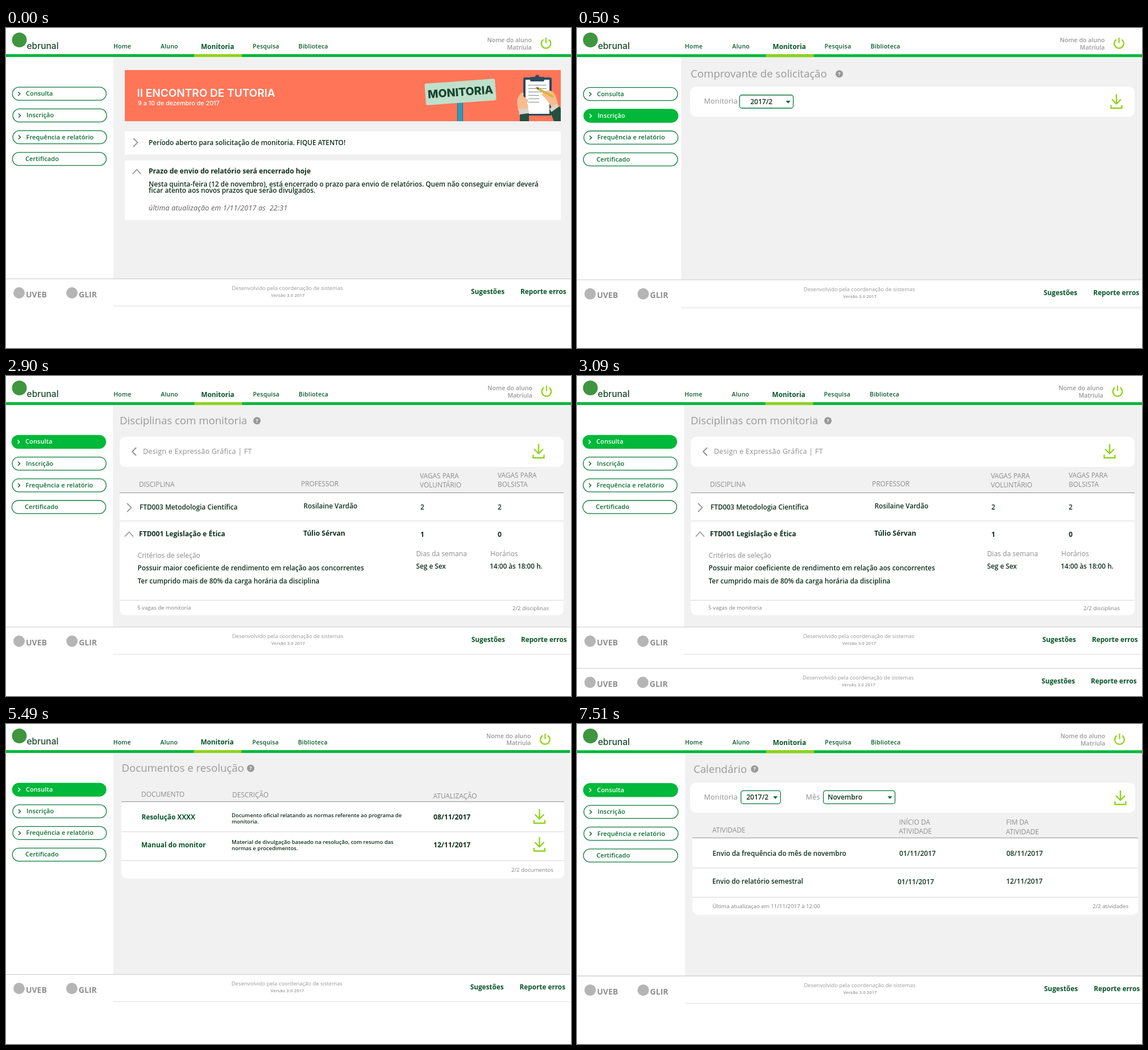
An HTML page that plays this animation: 994 px wide and 563 px high, repeating every 8 s.

```html
<!DOCTYPE html>
<html lang="pt">
<head>
<meta charset="utf-8">
<style>
html, body { margin: 0; width: 100%; height: 100%; overflow: hidden; background: #fff; }
svg { display: block; width: 100vw; height: 100vh; }
text { font: 600 11.8px "Open Sans", sans-serif; fill: #10301f; }
.nav { font-size: 10.5px; letter-spacing: .2px; fill: #0b5a2c; }
.item { font-size: 11px; letter-spacing: .1px; fill: #0b6b33; }
.bold { font-weight: 700; font-size: 12.1px; }
.semi { font-size: 12px; }
.title { font-weight: 400; font-size: 18.6px; fill: #999; }
.label { font-weight: 500; font-size: 12.1px; fill: #8c8c8c; }
.head { font-weight: 400; font-size: 11.9px; fill: #8c8c8c; }
.field { font-weight: 500; font-size: 12.5px; letter-spacing: .25px; fill: #8c8c8c; }
.small { font-size: 9.45px; }
.note { font-weight: 500; font-size: 9.7px; fill: #808080; }
.user { font-size: 10.6px; fill: #999; text-anchor: end; }
.credit { font-weight: 500; font-size: 9.5px; fill: #999; text-anchor: middle; }
.version { font-size: 7.6px; letter-spacing: .15px; fill: #999; text-anchor: middle; }
.link { font-weight: 700; font-size: 11.8px; fill: #07542a; }
.brand { font: 500 15.5px Inter, sans-serif; fill: #1c4a2c; }
.org { font-weight: 700; font-size: 14px; fill: #8f8f8f; }
.updated { font-style: italic; font-weight: 400; font-size: 12.4px; letter-spacing: .25px; fill: #5c5c5c; }
.banner { font: 600 19px Inter, sans-serif; fill: #fff; }
.dates { font: 500 10.8px Inter, sans-serif; fill: #fff; }
.sign { font: 800 19.5px Inter, sans-serif; fill: #17452f; text-anchor: middle; }
.mark { font-weight: 700; font-size: 9px; fill: #fff; text-anchor: middle; }
.white { fill: #fff; }
</style>
</head>
<body>
<svg id="stage" viewBox="0 0 994 563" preserveAspectRatio="none"></svg>
<script>
const GREEN = '#00b83a', LIME = '#90d31c', DARK = '#0b7a3c', PANEL = '#f1f1f1';

// Drawing helpers: each returns SVG markup
const text = (x, y, str, cls = '') => `<text x="${x}" y="${y}" class="${cls}">${str}</text>`;
const rect = (x, y, w, h, fill = '#fff', r = 0, stroke = 'none') =>
  `<rect x="${x}" y="${y}" width="${w}" height="${h}" rx="${r}" fill="${fill}" stroke="${stroke}" stroke-width="1.3"/>`;
const circle = (x, y, r, fill) => `<circle cx="${x}" cy="${y}" r="${r}" fill="${fill}"/>`;
const line = (d, color, width = 1) => `<path d="${d}" fill="none" stroke="${color}" stroke-width="${width}"/>`;
const shape = (d, fill) => `<path d="${d}" fill="${fill}"/>`;
const group = (transform, body) => `<g transform="${transform}">${body}</g>`;
const rule = (x1, x2, y, color = '#d6d6d6') => line(`M${x1} ${y}H${x2}`, color);

const card = (x, y, x2, y2, r = 10) => rect(x, y, x2 - x, y2 - y, '#fff', r);
const table = (x, y, x2, y2) => card(x, y, x2, y2) + rect(x, y, x2 - x, 14) + rule(x, x2, y, '#8f8f8f');
const right = (x, y) => line(`M${x} ${y - 7.5}l7.5 7.5l-7.5 7.5`, '#999', 1.8);
const left = (x, y) => line(`M${x} ${y - 7}l-7 7l7 7`, '#8c8c8c', 1.8);
const up = (x, y) => line(`M${x - 7.5} ${y + 4}l7.5 -8l7.5 8`, '#999', 1.8);
const title = (x, y, str, markX) =>
  text(x, y, str, 'title') + circle(markX, y - 6.3, 6.5, '#999') + text(markX, y - 3.2, '?', 'mark');
const download = (x, y) =>
  line(`M${x} ${y}v17m-8 -8l8 8l8 -8M${x - 9.5} ${y + 19}v5.5h19v-5.5`, LIME, 2.3);
const select = (x, y, w, textX, str) => rect(x, y, w, 23, '#fff', 4, DARK) +
  text(textX, y + 15.5, str, 'semi') + shape(`M${x + w - 13} ${y + 10}h8l-4 4.5z`, '#0b5a2c');
const checkbox = (x, y, on) => rect(x, y, 13, 13, '#fff', 2, DARK) +
  (on ? line(`M${x + 3} ${y + 6.5}l2.8 3l4.5 -6`, '#0b5a2c', 1.7) : '');

const header = () =>
  circle(23.5, 21, 13, '#3f963f') + text(36.5, 36.5, 'ebrunal', 'brand') +
  rect(0, 46, 994, 5, GREEN) + rect(331, 46, 84, 5, LIME) +
  [[189, 'Home'], [272, 'Aluno'], [434, 'Pesquisa'], [514.5, 'Biblioteca']]
    .map(([x, str]) => text(x, 36, str, 'nav')).join('') +
  text(343, 36.5, 'Monitoria', 'link') +
  text(925, 25, 'Nome do aluno', 'user') + text(925, 37.5, 'Matríula', 'user') +
  line('M945.5 20.3a8.3 8.3 0 1 0 9 0M950 17v9.5', LIME, 2.2);

const sidebar = active => ['Consulta', 'Inscrição', 'Frequência e relatório', 'Certificado']
  .map((name, i) => {
    const on = i === active, x = [11.3, 12, 12, 11.3][i], y = 104.2 + i * 38.2;
    return rect(x, y, 165, 23, on ? GREEN : '#fff', 11.5, on ? GREEN : DARK) +
      (i < 3 ? line(`M${x + 10} ${y + 8.2}l3.5 3.4l-3.5 3.4`, on ? '#fff' : '#0b5a2c', 1.4) : '') +
      text([35, 36, 35.5, 34][i], y + 15, name, on ? 'item white' : 'item');
  }).join('');

const footer = (scale, dy) => group(`scale(${scale}) translate(0 ${dy})`,
  rule(0, 994, 441.3, '#c9c9c9') +
  circle(23, 466, 10, '#b5b5b5') + text(35, 473.7, 'UVEB', 'org') +
  circle(116, 466, 10, '#b5b5b5') + text(128, 473.7, 'GLIR', 'org') +
  text(495, 461, 'Desenvolvido pela coordenação de sistemas', 'credit') +
  text(495.8, 473, 'Versão 3.0 2017', 'version') +
  text(818, 468, 'Sugestões', 'link') + text(905, 468, 'Reporte erros', 'link'));

function page({ scale, active, edge = 189, sideX = 0, dy = 0, strip = 1.2 }, content) {
  return rect(0, 0, 994, 563) +
    group(`scale(${scale})`,
      rect(edge, 51, 994 - edge, 390 + dy, PANEL) +
      rect(edge, 488.6 + dy, 994 - edge, strip, strip > 2 ? PANEL : '#e2e2e2') +
      header() + group(`translate(${sideX} 0)`, sidebar(active))) +
    footer(scale, dy) + content;
}

const signpost = rect(794, 131, 10, 33, '#2c9cc0') + line('M794.5 131v33M803.5 131v33', '#1f6f8c') +
  group('translate(799.5 112.5) rotate(-4.2)',
    rect(-62, -19, 124, 38, '#bfe0cb', 3) + text(0, 7, 'MONITORIA', 'sign'));

const clipboard =
  rect(910, 87, 50, 67, '#2b4a5e', 3) + rect(914, 91, 42, 60) +
  rect(922, 86, 25, 8, '#2b4a5e', 2) + circle(934.5, 86, 3.5, '#2b4a5e') +
  [0, 1, 2, 3, 4, 5].map(i => rule(919, i > 2 ? 938 : 951, 100.5 + i * 6, '#7c8a90')).join('') +
  shape('M901 145L899 130Q899 122 907 114Q912 112 910 120L917 125Q921 129 916 132Q921 137 917 145Z', '#f6bd91') +
  shape('M942 117Q950 106 962 112Q969 120 971 136L961 143Q955 128 942 117Z', '#f6bd91') +
  line('M936 107L963 121', '#d9b42c', 4) + shape('M932 104l6 1l-2 4z', '#7a5a35') +
  shape('M902 143l17 -1l1 9l-17 2z', '#d8d5cb') + shape('M956 142l13 -9l5 6l-13 11z', '#d8d5cb') +
  shape('M904 152l16 -2v14h-16z', '#24503f') + shape('M958 149l15 -11l3 3v23h-12z', '#24503f');

const criteria = (x, y) => text(x, y, 'Critérios de seleção', 'label') +
  text(x, y + 22, 'Possuir maior coeficiente de rendimento em relação aos concorrentes') +
  text(x, y + 45.3, 'Ter cumprido mais de 80% da carga horária da disciplina');

const news = page({ scale: 1 },
  rect(209, 74, 767, 90, '#ff7558') +
  text(230.5, 120.5, 'II ENCONTRO DE TUTORIA', 'banner') +
  text(232, 136, '9 a 10 de dezembro de 2017', 'dates') + signpost + clipboard +
  card(209, 182, 976, 222.5, 0) + right(224, 201.5) +
  text(251, 205.5, 'Período aberto para solicitação de monitoria. FIQUE ATENTO!') +
  card(209, 233, 976, 338, 0) + up(230, 253) +
  text(251, 256, 'Prazo de envio do relatório será encerrado hoje', 'bold') +
  text(251, 279, 'Nesta quinta-feira (12 de novembro), está encerrado o prazo para envio de relatórios. Quem não conseguir enviar deverá') +
  text(251, 290, 'ficar atento aos novos prazos que serão divulgados.') +
  text(251, 320.5, 'última atualização em 1/11/2017 as\u00a0 22:31', 'updated'));

const receipt = page({ scale: 1.0037, active: 1, edge: 182.6, strip: 3.2 },
  title(200, 87, 'Comprovante de solicitação', 461.5) +
  card(199, 103, 981, 156) + text(223.5, 133, 'Monitoria', 'field') +
  select(286, 118, 94.5, 305, '2017/2') + download(949, 116.5));

const subjects = page({ scale: 1.001, active: 0, edge: 188, sideX: -1 },
  title(200, 85, 'Disciplinas com monitoria', 441.5) +
  card(200, 107, 981, 160) + left(229, 133) +
  text(241, 137, 'Design e Expressão Gráfica | FT', 'field') + download(937, 119.5) +
  text(234, 194.5, 'DISCIPLINA', 'head') + text(519, 194, 'PROFESSOR', 'head') +
  text(728, 180, 'VAGAS PARA', 'head') + text(728, 196, 'VOLUNTÁRIO', 'head') +
  text(865, 178.5, 'VAGAS PARA', 'head') + text(865, 194.5, 'BOLSISTA', 'head') +
  table(200, 205.5, 981, 421) + rule(200, 981, 255) + rule(200, 981, 394.5) +
  right(213, 231.5) + text(235, 234.5, 'FTD003 Metodologia Científica') +
  text(523.5, 233, 'Rosilaine Vardão') + text(729, 235, '2', 'semi') + text(865, 235, '2', 'semi') +
  up(216.5, 278.5) + text(234, 282, 'FTD001 Legislação e Ética', 'bold') +
  text(523, 280.5, 'Túlio Sérvan', 'bold') + text(729, 283, '1', 'bold') + text(865, 283, '0', 'bold') +
  criteria(231.5, 320) +
  text(721.5, 317, 'Dias da semana', 'label') + text(721.5, 339, 'Seg e Sex') +
  text(852, 317, 'Horários', 'label') + text(851, 338.5, '14:00 às 18:00 h.') +
  text(231, 411, '5 vagas de monitoria', 'note') + text(891, 411.5, '2/2 disciplinas', 'note'));

const request = page({ scale: .999, active: 1, sideX: .8, dy: 73.5 },
  title(200.5, 84.5, 'Solicitação de monitoria', 428.5) +
  card(202, 102, 981, 154.5) + left(225, 128) + text(237, 132, 'Turmas solicitadas | 2017/2', 'field') +
  card(202, 168.5, 981, 399.5) + rule(202, 981, 244) + rule(202, 981, 329.5) +
  [[219, 'Disciplina', 'FT001 Legislação e Ética - turma 2'],
   [464.5, 'Professor (a)', 'Joana Florisbenta dos Rios'],
   [683, 'Dias da semana', 'Seg e Sex'],
   [814, 'Horários', '14:00 às 18:00 h.']]
    .map(([x, label, value]) => text(x, 200.5, label, 'label') + text(x, 222, value)).join('') +
  criteria(222.5, 264) +
  text(222.5, 349.5, 'Concorrer às vagas de:', 'label') +
  checkbox(223, 363.5, true) + text(241, 374.5, 'Voluntário') +
  checkbox(312.3, 363.5, false) + text(330.5, 374.5, 'Bolsista') +
  card(202, 413, 981, 503) + checkbox(220.7, 431, true) +
  text(238.5, 442, 'Estou ciente que ao ser selecionado(a) irei cumprir minhas obrigações de monitor de acordo com a resolução 000/2017.') +
  rect(822, 465, 144, 24, '#0a5c2d', 12) + text(836, 481, 'Finalizar solicitação', 'bold white'));

const documents = page({ scale: .9984, active: 0 },
  title(203.5, 84.3, 'Documentos e resolução', 430.5) +
  text(238, 128, 'DOCUMENTO', 'head') + text(398, 129, 'DESCRIÇÃO', 'head') +
  text(751.5, 131, 'ATUALIZAÇÃO', 'head') +
  table(203, 136.7, 982, 272) + rule(203, 982, 189.7) + rule(203, 982, 240.5) +
  text(238.5, 168, 'Resolução XXXX', 'link') + text(238, 216.5, 'Manual do monitor', 'link') +
  text(397, 163.5, 'Documento oficial relatando as normas referente ao programa de', 'small') +
  text(397, 174.5, 'monitoria.', 'small') +
  text(397, 210.5, 'Material de divulgação baseado na resolução, com resumo das', 'small') +
  text(397, 221.5, 'normas e procedimentos.', 'small') +
  text(752, 168, '08/11/2017', 'bold') + text(752, 216.5, '12/11/2017', 'bold') +
  download(938.5, 150) + download(938.5, 199) + text(889, 260, '2/2 documentos', 'note'));

const calendar = page({ scale: 1.0047, active: 0 },
  title(205, 85.5, 'Calendário', 312.5) +
  card(199, 103, 982, 156) + text(223.5, 133, 'Monitoria', 'field') +
  select(288.5, 117.3, 69.5, 298, '2017/2') + text(402.5, 133, 'Mês', 'field') +
  select(433.5, 117.3, 126, 441, 'Novembro') + download(956, 117) +
  text(238, 191, 'ATIVIDADE', 'head') +
  text(566.5, 176.5, 'INÍCIO DA', 'head') + text(566, 192.5, 'ATIVIDADE', 'head') +
  text(755, 176.5, 'FIM DA', 'head') + text(754.5, 194, 'ATIVIDADE', 'head') +
  table(203, 200.3, 987, 336) + rule(203, 987, 253.3) + rule(203, 987, 304.8) +
  text(238.5, 232, 'Envio da frequência do mês de novembro') +
  text(238, 280.5, 'Envio do relatório semestral') +
  text(567, 232, '01/11/2017', 'semi') + text(564, 281.5, '01/11/2017', 'semi') +
  text(755.5, 232, '08/11/2017', 'semi') + text(755, 280.5, '12/11/2017', 'semi') +
  text(238.5, 323.5, 'Última atualizaçao em 11/11/2017 à 12:00', 'note') +
  text(907, 324, '2/2 atividades', 'note'));

// Start time of each view; the taller page's footer shows before the page itself
const timeline = [
  [0, news], [500, receipt], [2900, subjects], [3090, subjects + footer(.999, 73.5)],
  [3470, request], [5490, documents], [7510, calendar],
];
const stage = document.getElementById('stage');
stage.innerHTML = timeline.map(([, view]) => `<g>${view}</g>`).join('');
const views = [...stage.children];

function play() {
  const time = performance.now() % 8000;
  const current = timeline.findLastIndex(([start]) => time >= start);
  views.forEach((view, i) => { view.style.display = i === current ? '' : 'none'; });
  requestAnimationFrame(play);
}
play();
</script>
</body>
</html>
```
